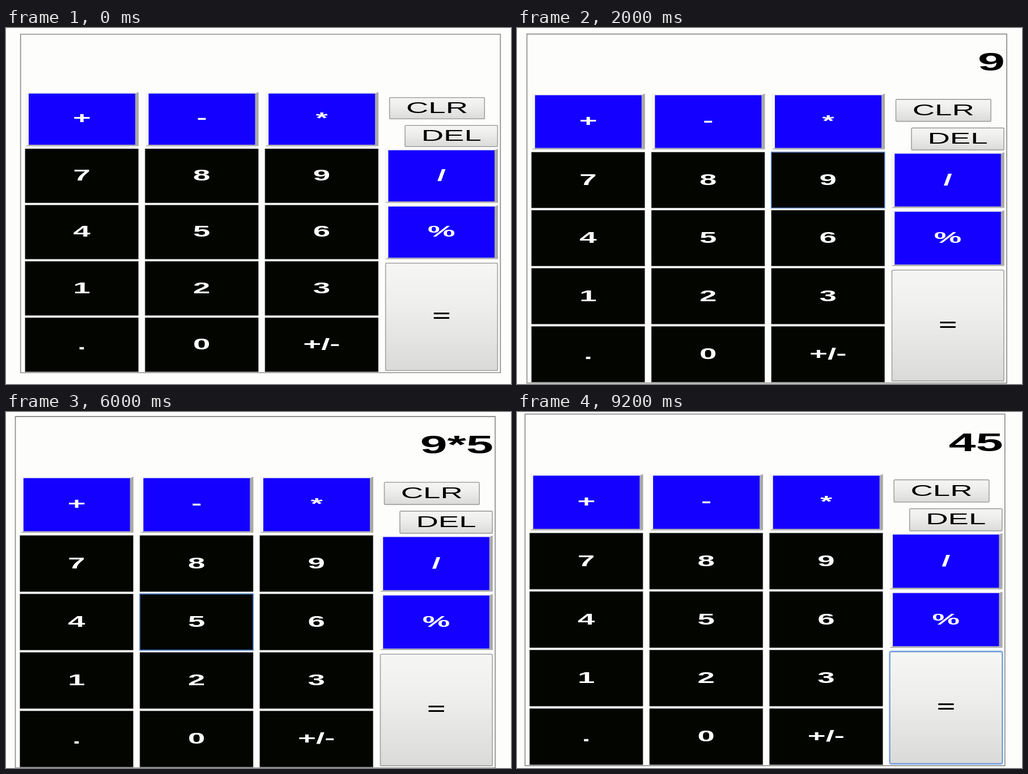
An HTML page with a canvas for the animation above (10 s loop, 891 by 628 pixels).

```html
<!DOCTYPE html>
<html lang="en">
<head>
<meta charset="utf-8">
<title>Calculator</title>
<style>
html, body { margin: 0; width: 100%; height: 100%; overflow: hidden; background: #fdfefc; }
canvas { display: block; }
</style>
</head>
<body>
<canvas id="stage" width="891" height="628"></canvas>
<script>
const ctx = document.getElementById('stage').getContext('2d');
const STEP = 2000;
const STRETCH = 2; // the whole face is twice as wide as its natural shape
const COL = 211.6, ROW = 99.3;

// Each step: display text, focused key, panel shift, top and vertical scale
const steps = [
  { text: '', focus: '', dx: 0, top: 11, k: 1 },
  { text: '9', focus: '9', dx: -8.2, top: 10.6, k: 1.0315 },
  { text: '9*', focus: '*', dx: 0.9, top: 2.2, k: 1.048 },
  { text: '9*5', focus: '5', dx: -9.2, top: 8, k: 1.0385 },
  { text: '45', focus: '=', dx: -11.5, top: 3.6, k: 1.039 }
];

const keys = [];
const addKey = (type, label, x, y, w, h, base) => keys.push({ type, label, x, y, w, h, base });

['+', '-', '*'].forEach((s, i) => addKey('blue', s, 34 + i * COL, 102, 200, 95.5, 157));
['789', '456', '123'].forEach((row, r) =>
  [...row].forEach((s, c) => addKey('black', s, 33.7 + c * COL, 202 + r * ROW, 200, 95.5, 258 + r * ROW)));
['.', '0', '+/-'].forEach((s, c) => addKey('black', s, 33.7 + c * COL, 500, 200, 95.5, 556));
['/', '%'].forEach((s, r) => addKey('blue', s, 668.5, 202 + r * ROW, 199.5, 95.5, 258 + r * ROW));
addKey('grey', 'CLR', 676, 111, 169, 39, 139);
addKey('grey', 'DEL', 703.5, 160, 164.5, 39, 187.5);
addKey('grey', '=', 669, 403, 199, 191, 506);

function poly(color, ...pts) {
  ctx.fillStyle = color;
  ctx.beginPath();
  pts.forEach(([x, y]) => ctx.lineTo(x, y));
  ctx.fill();
}

function label(text, x, y, size, color, weight, align) {
  ctx.save();
  ctx.translate(x, y);
  ctx.scale(STRETCH, 1);
  ctx.font = `${weight} ${size}px "Liberation Sans", Arial, sans-serif`;
  ctx.textAlign = align;
  ctx.fillStyle = color;
  ctx.fillText(text, 0, 0);
  ctx.restore();
}

function outline(x, y, w, h, color, width, radius = 0) {
  ctx.strokeStyle = color;
  ctx.lineWidth = width;
  ctx.beginPath();
  ctx.roundRect(x, y, w, h, radius);
  ctx.stroke();
}

const paint = {
  black({ x, y, w, h }) {
    ctx.fillStyle = '#020500';
    ctx.fillRect(x, y, w, h);
    outline(x, y, w, h, 'rgba(120,120,120,.5)', 1);
  },
  blue({ x, y, w, h }) {
    const r = x + w, b = y + h, bx = 6, by = 2.6;
    poly('#f6f7f5', [x, y], [r, y], [r, b], [x, b]);
    poly('#a9a9a9', [r, y], [r, b], [r - bx, b - by], [r - bx, y + by]);
    poly('#b0b0b0', [x, b], [r, b], [r - bx, b - by], [x + bx, b - by]);
    ctx.fillStyle = '#1400ff';
    ctx.fillRect(x + bx, y + by, w - 2 * bx, h - 2 * by);
  },
  grey({ x, y, w, h }) {
    const g = ctx.createLinearGradient(0, y, 0, y + h);
    g.addColorStop(0, '#f6f7f5');
    g.addColorStop(0.4, '#eeefed');
    g.addColorStop(1, '#dadbd9');
    ctx.fillStyle = g;
    ctx.fillRect(x, y, w, h);
    outline(x + 0.7, y + 0.7, w - 1.4, h - 1.4, '#a2a2a2', 1.6, 2);
  }
};

function focusRing({ type, x, y, w, h }) {
  if (type === 'black') outline(x, y, w, h, '#4f80cc', 1.6);
  else if (type === 'grey') outline(x, y, w, h, '#7ca6e8', 2.4, 3);
  else outline(x, y, w + 0.5, h, '#a3c5f4', 2.8, 2);
}

function drawKey(key, focused) {
  paint[key.type](key);
  if (focused) focusRing(key);
  const grey = key.type === 'grey';
  const weight = grey && key.label !== '=' ? 'normal' : 'bold';
  label(key.label, key.x + key.w / 2, key.base, 27.3, grey ? '#000' : '#fff', weight, 'center');
}

function draw(now) {
  const s = steps[Math.floor(now / STEP) % steps.length];
  ctx.setTransform(1, 0, 0, 1, 0, 0);
  ctx.fillStyle = '#fdfefc';
  ctx.fillRect(0, 0, 891, 628);
  ctx.setTransform(1, 0, 0, s.k, s.dx, s.top);
  outline(25.7, 0, 846.6, 597, '#8e8e8e', 1.7);
  label(s.text, 869, 62.5, 43, '#000', 'bold', 'right');
  keys.forEach(key => drawKey(key, key.label === s.focus));
}

function tick() {
  draw(performance.now());
  requestAnimationFrame(tick);
}
tick();
</script>
</body>
</html>
```
